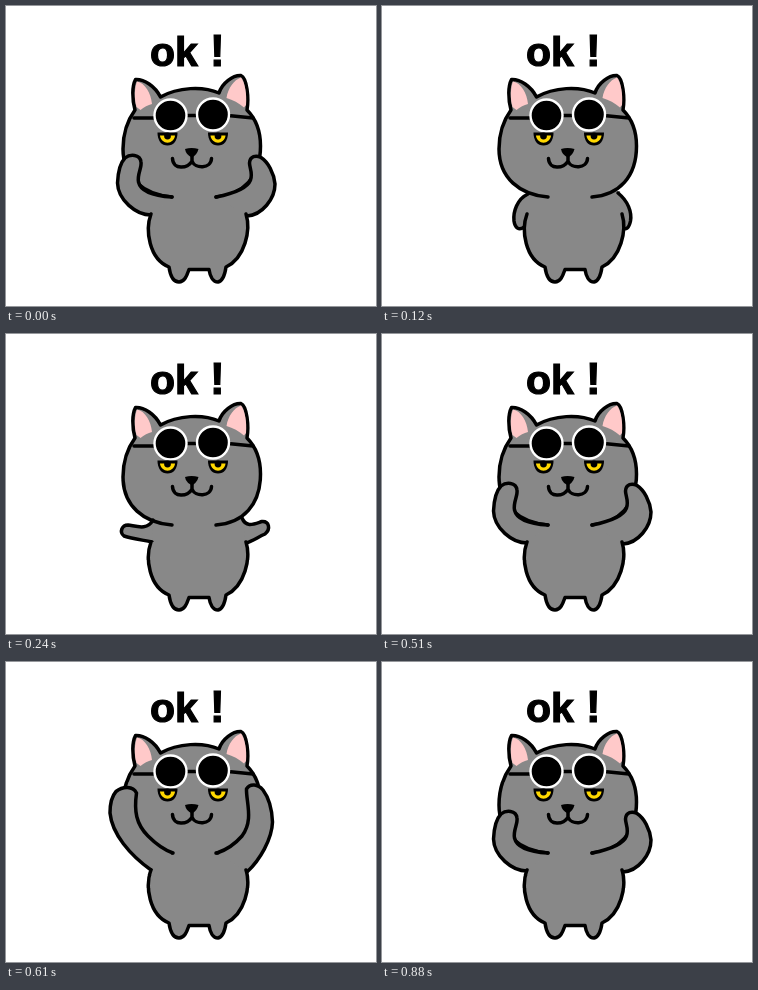
These frames come from a looping animation (370x300 px, 980 ms). An HTML page without scripts:

```html
<!DOCTYPE html>
<html lang="en">
<head>
<meta charset="utf-8">
<title>ok !</title>
<style>
  html, body { margin: 0; width: 100%; height: 100%; overflow: hidden; background: #fff; }
  svg { display: block; width: 100%; height: 100%; }
  text { font: bold 41px "Liberation Sans", Arial, sans-serif; stroke: #000; stroke-width: 1.2; }
  .mark { font-size: 44px; }
  .fur { fill: #888; }
  .line { stroke: #000; stroke-width: 3.5; stroke-linecap: round; stroke-linejoin: round; }
  .none { fill: none; }
  .pink { fill: #ffc9c9; }
  .arms { visibility: hidden; animation: 980ms step-end infinite; }
  .cheeks { animation-name: cheeks; }
  .down { animation-name: down; }
  .wide { animation-name: wide; }
  .up { animation-name: up; }
  @keyframes cheeks {
    0%, 36.735%, 74.49% { visibility: visible; }
    12.245%, 62.245% { visibility: hidden; }
    100% { visibility: visible; }
  }
  @keyframes down {
    0%, 24.49%, 100% { visibility: hidden; }
    12.245% { visibility: visible; }
  }
  @keyframes wide {
    0%, 36.735%, 100% { visibility: hidden; }
    24.49% { visibility: visible; }
  }
  @keyframes up {
    0%, 74.49%, 100% { visibility: hidden; }
    62.245% { visibility: visible; }
  }
</style>
</head>
<body>
<svg viewBox="0 0 370 300">
  <defs>
    <g id="eye">
      <path d="M-10 -1.500H10C10 7 6 11.5 0 11.5S-10 7 -10 -1.500Z"/>
      <path d="M-7.500 1.500C-6.500 11 6.500 11 7.500 1.500Z" fill="#ffd800"/>
      <circle cy="2" r="3.4"/>
    </g>
    <ellipse id="lens" rx="16" ry="16" stroke="#fff" stroke-width="2.4"/>
  </defs>

  <text x="144" y="59.500">ok</text>
  <text class="mark" x="204" y="59.500">!</text>

  <path class="fur" d="M145 185H238L241 208H143Z"/>

  <!-- head -->
  <path class="fur line" d="M166 191C138 189 117 172 117 143C117 128 121 115 129 104
    C126 93 126 80 129.500 73.500C138 73 149 80 154.500 91C172 81 197 80 213 87
    C216 77 227 69 235 69.500C241 72 243 92 241 104C250 113 254.500 126 254.500 140C254.500 171 237 189 210 191"/>
  <path class="pink" d="M131 75.500C139 77 145 87 146 98C142 99 138 101 134.500 104L130.500 101C128 92 128.500 82 131 75.500Z"/>
  <path class="pink" d="M235 71.500C228 74 222 82 220.500 92C227 94 233 97 238 101.500L240 99C241 88 239 77 235 71.500Z"/>

  <!-- arms -->
  <g class="fur line">
    <g class="arms cheeks">
      <path d="M145 209C130 209 112 194 111.500 177C112 166 114 157 119 152
        C124 148 134 148 135 156C136 162 131 168 132.500 176C135 187 151 190 166 191"/>
      <path d="M241 210C256 209 269 193 269 178C268 167 262 156 255 151.500
        C250 149 244 150 243.500 157C243.500 162 247 167 244.500 174C241 183 225 188 210 191"/>
    </g>
    <g class="arms down">
      <path d="M146 188C135 193 131 206 132 215C133 222 137 225 142 221"/>
      <path d="M236 187C246 195 250 206 248.500 215C247 222 244 225 239.500 221"/>
    </g>
    <g class="arms wide">
      <path d="M147 186C141 197 130 192 122 191C116 191 113 198 118 202C127 205 137 206 146 208"/>
      <path d="M236 184C240 194 248 190 256 187.500C263 187 265 195 259 200C252 203 247 207 240 209"/>
    </g>
    <g class="arms up">
      <path d="M145 208C124 193 106 172 104 151C104 142 106 134 110 129.500
        C117 124 127 124 130.500 131C128 149 130 162 142 174C149 181 158 188 167 191"/>
      <path d="M241 210C254 198 266 177 266.500 160C266 147 263 136 257 128
        C252 122 244 121 240.500 127C240 140 248 158 236 174C229 182 220 188 211 191"/>
    </g>
  </g>

  <!-- body -->
  <path class="fur line" d="M145 208C139 224 143 253 163 261C164 268 167 276 173 276
    C179 276 181 269 183 263.500H203C204 270 207 276 212 276C217 275 219 268 220 261
    C239 252 245 224 240 208"/>

  <!-- goggles -->
  <path class="line none" d="M128 112H149M222 109.500L247 112M180 109.500H192"/>
  <use href="#lens" x="164.500" y="109.500"/>
  <use href="#lens" x="207" y="108.500"/>

  <!-- face -->
  <use href="#eye" x="161.500" y="128"/>
  <use href="#eye" x="212" y="128"/>
  <path d="M179 143Q185.500 141 192.500 143Q191 149 186 151.500Q180 149 179 143Z"/>
  <path class="line none" d="M186 149V155C182 163 167 164 166.500 152.500M186 155C189 163 205 163 205.500 152.500"/>
</svg>
</body>
</html>
```
